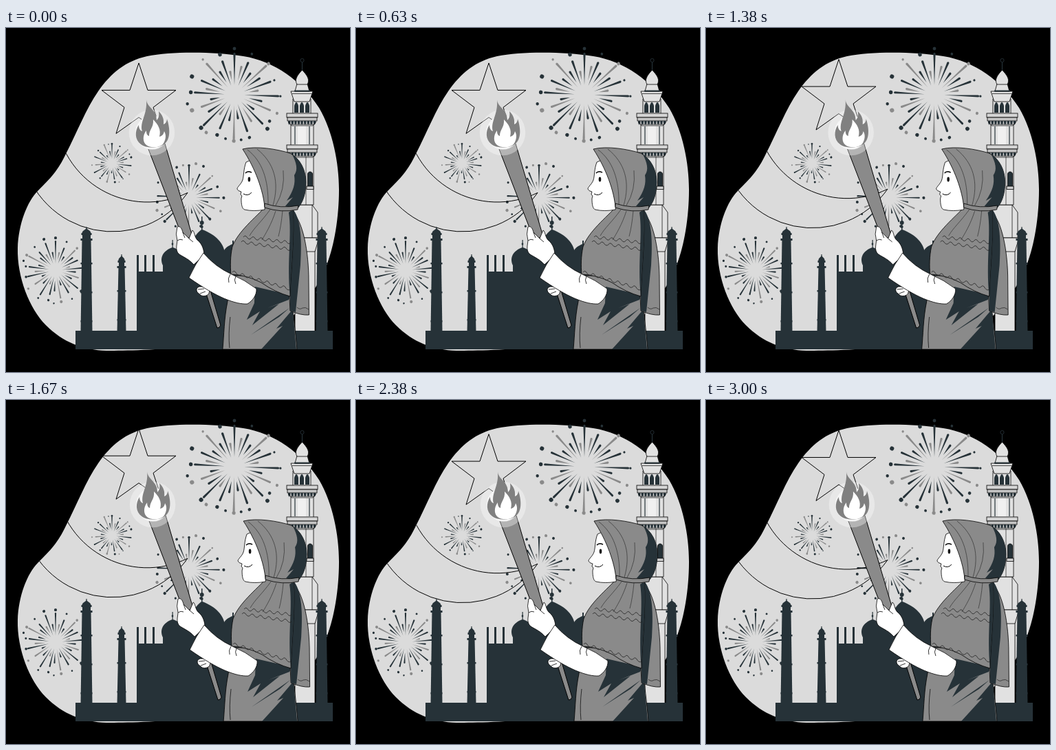
These frames come from a looping animation (500 by 500 pixels, 3.04 s). An HTML page with a canvas:

```html
<!DOCTYPE html>
<html lang="en">
<head>
<meta charset="utf-8">
<title>Torch night</title>
<style>
html, body { margin: 0; width: 100%; height: 100%; overflow: hidden; background: #000; }
canvas { display: block; width: 500px; height: 500px; }
</style>
</head>
<body>
<canvas id="stage"></canvas>
<script>
const LOOP = 3040, LEAD = 20;
const DARK = '#263238', GREY = '#8a8a8a', SKY = '#dbdbdb', STONE = '#e1e1e1';
const canvas = document.getElementById('stage');
const scale = Math.max(1, window.devicePixelRatio || 1);
canvas.width = canvas.height = 500 * scale;
let ctx = canvas.getContext('2d');

function shape(d, fill, stroke, width = 0.8) {
  const p = new Path2D(d);
  if (fill) { ctx.fillStyle = fill; ctx.fill(p); }
  if (stroke) { ctx.strokeStyle = stroke; ctx.lineWidth = width; ctx.stroke(p); }
}
const line = (d, width, color = '#000') => shape(d, null, color, width);
function disc(x, y, r, fill, stroke) {
  ctx.beginPath();
  ctx.arc(x, y, r, 0, Math.PI * 2);
  if (fill) { ctx.fillStyle = fill; ctx.fill(); }
  if (stroke) { ctx.strokeStyle = stroke; ctx.lineWidth = 0.9; ctx.stroke(); }
}
function box(x, y, w, h, fill, stroke) {
  ctx.fillStyle = fill;
  ctx.fillRect(x, y, w, h);
  if (stroke) { ctx.strokeStyle = '#000'; ctx.lineWidth = 0.8; ctx.strokeRect(x, y, w, h); }
}

function random(seed) {
  return () => (seed = (seed * 16807) % 2147483647) / 2147483647;
}

// Tapered rays around a point, with dots beyond some of the tips.
function firework(x, y, r, rays, seed, weight) {
  const rnd = random(seed);
  const reach = [0.8, 0.52, 0.68, 0.42];
  for (let i = 0; i < rays; i++) {
    const a = (i + rnd() * 0.3) / rays * Math.PI * 2 - Math.PI / 2;
    const far = r * (reach[i % 4] + rnd() * 0.12);
    const near = r * (i % 2 ? 0.3 : 0.2);
    const color = i % 3 === 1 ? GREY : DARK;
    ctx.save();
    ctx.translate(x, y);
    ctx.rotate(a);
    ctx.fillStyle = color;
    ctx.beginPath();
    ctx.moveTo(near, 0);
    ctx.lineTo(far, -weight);
    ctx.arc(far, 0, weight, -Math.PI / 2, Math.PI / 2);
    ctx.closePath();
    ctx.fill();
    if (i % 2 === 0 || rnd() > 0.7) {
      disc(r * (0.86 + rnd() * 0.13), 0, weight * (0.9 + rnd() * 1.1), color);
    }
    ctx.restore();
  }
}

function minaret(x, top, half) {
  box(x - 0.6, top, 1.2, 8, DARK);
  shape(`M${x - half + 1} ${top + 12}C${x - half} ${top + 5} ${x - 2} ${top + 5} ${x} ${top + 2}
    C${x + 2} ${top + 5} ${x + half} ${top + 5} ${x + half - 1} ${top + 12}Z`, DARK);
  box(x - half, top + 9, half * 2, 3, DARK);
  box(x - half + 1.5, top + 11, half * 2 - 3, 8, DARK);
  box(x - half - 1, top + 17, half * 2 + 2, 3, DARK);
  shape(`M${x - half + 1} ${top + 18}H${x + half - 1}L${x + half + 1} 442H${x - half - 1}Z`, DARK);
  for (let y = top + 52; y < 435; y += 42) box(x - half - 1, y, half * 2 + 2, 2.5, DARK);
}

function skyline() {
  minaret(117, 289, 7.5);
  minaret(168, 329, 5.5);
  minaret(459, 289, 7.5);
  box(101, 440, 374, 27, DARK);
  box(190, 354, 180, 100, DARK);
  for (const x of [190, 201, 213]) box(x, 330, 3, 26, DARK);
  shape('M228 360V345C223 334 228 324 241.5 319V308H242.7V319C255 323 261 333 257 345V360Z', DARK);
  disc(242, 314, 1.4, DARK);
  shape('M254 360V328C268 324 269 304 284 293V274H285.5V293C306 301 316 313 318 326V360Z', DARK);
  disc(284.7, 283, 3, DARK);
  disc(284.7, 289, 2, DARK);
  shape('M316 360V326C318 319 323 317 329 314V309H331V314C340 318 344 326 344 360Z', DARK);
}

function balcony(y) {
  box(408, y, 45, 6, '#d4d4d4', true);
  box(409, y + 6, 43, 5, '#c4c4c4', true);
  for (let i = 0; i < 9; i++) {
    const x = 410 + i * 4.6;
    shape(`M${x} ${y + 11}h3.4v3l-1.7 3l-1.7 -3z`, DARK);
  }
  line(`M411 ${y + 12}L415 ${y + 18}H446L451 ${y + 12}`, 0.7);
}

function tower() {
  shape('M420 322H449V467H420Z', STONE, '#000');
  shape('M415 257H445L453 268V305H415Z', STONE, '#000');
  line('M445 257V305', 0.7);
  shape('M414 305H455L449 325H420Z', STONE, '#000');
  shape('M416 186H447V257H416Z', STONE, '#000');
  line('M436 187V257', 0.6);
  shape('M438.5 231V212C439 208 445 208 445.5 212V231Z', DARK, '#000');
  box(437, 230, 10, 4.5, '#d0d0d0', true);
  shape('M414 140H447V171H414Z', STONE, '#000');
  for (const x of [420, 441]) line(`M${x} 143V169`, 1.2, DARK);
  box(424, 142, 12, 28, '#f0f0f0');
  balcony(170);
  shape('M417 103H443V125H417Z', STONE, '#000');
  for (const x of [419, 427, 435]) {
    shape(`M${x} 123V113Q${x + 3} 103 ${x + 6} 113V123Z`, DARK);
  }
  balcony(124);
  shape('M414 92H446L441 107H419Z', STONE, '#000');
  line('M416 95.5H444', 0.7);
  shape('M423 81H438L441 92H420Z', STONE, '#000');
  shape('M423 82C419 75 423 69 430.5 61C438 69 442 75 438 82Z', STONE, '#000');
  box(419, 90.5, 23, 2, DARK);
  line('M430.5 61V50', 1.2, DARK);
  disc(430.5, 47, 2.6, null, DARK);
}

const BLOB = 'M17 320C18 285 31 252 46 237C65 218 75 208 87 183C104 150 116 118 134 92'
  + 'C153 65 174 48 205 41C240 34 300 34 345 41C390 48 430 77 455 116C475 150 484 196 484 235'
  + 'C484 276 477 316 467 342C454 376 430 412 400 432C340 465 200 469 146 469'
  + 'C112 468 83 457 58 432C34 408 16 362 17 320Z';

function background() {
  shape(BLOB, SKY);
  firework(332, 97, 71, 32, 71, 1.6);
  firework(266, 246, 51, 32, 19, 1.1);
  firework(154, 197, 31, 30, 43, 0.8);
  firework(72, 352, 49, 34, 87, 1.1);
}

function starAndMoon(dy) {
  ctx.save();
  ctx.clip(new Path2D(BLOB));
  ctx.translate(0, dy - 0.6);
  line('M193 51.5L206 91H247L214 116L226.5 154L193 130.5L160 154L172 116L139 91H180Z', 1);
  line('M24 190A133.6 133.6 0 0 0 264 240A133.6 133.6 0 0 1 72 130', 1);
  ctx.restore();
}

function torch() {
  shape('M290 383L297 381L312 432Q311 436 307 436Z', GREY, '#000', 1);
  shape('M207 176L231 168L271 303L258 308Z', GREY, '#000', 1);
  disc(212, 152, 33.3, 'rgba(255,255,255,0.36)');
  disc(212.5, 152, 24.5, '#f6f6f6');
  shape('M204 104C205 116 219 118 219 134C222 131 223 127 222 121C228 127 230 133 229 140'
    + 'C232 139 234 136 234 132C239 147 239 162 230 169C222 175 203 175 196 169'
    + 'C187 162 187 150 193 141C193 146 195 149 198 150C194 136 206 126 204 104Z', '#808080');
  shape('M214 133C215 145 208 147 208 157C205 156 204 153 204 149C198 157 199 166 204 170'
    + 'C210 175 223 174 228 169C233 162 233 155 230 150C229 155 227 157 223 158'
    + 'C226 148 221 140 214 133Z', '#fff');
}

// Scalloped trim along a straight run.
function trim(x, y, dx, dy, n) {
  let d = `M${x} ${y}`;
  for (let i = 0; i < n; i++) d += `q${dx / n / 2} ${i % 2 ? 4 : -4} ${dx / n} ${dy / n}`;
  line(d, 0.8, '#222');
}

function dress() {
  shape('M328 360L322 398C317 422 317 446 315 467H423C421 440 417 415 414 380L370 360Z', GREY, '#000');
  shape('M362 376L414 388L411 395L380 407L397 401L358 432L369 412L350 424L361 400Z', DARK);
  shape('M412 407L356 446L397 420Z', DARK);
  shape('M415 411L393 437L402 433L371 467H422L417 411Z', DARK);
  line('M326 420Q323 445 325 465', 0.7);
}

function veil() {
  shape('M410 262C430 272 439 318 440 360L440.5 417Q429 418 413 411L408 300Z', GREY, '#000');
  shape('M416 262C427 274 431 300 428 345L421 413L413 411V388L408 300Z', DARK);
  line('M423 406q4 4 8 1q4 -2 9 2', 0.7, '#222');
  shape('M379 258C362 276 337 296 329 318C326 332 326 346 327 358Q350 359 371 370'
    + 'Q391 384 413 390C414 354 420 300 417 264Z', GREY, '#000');
  shape('M411 268C416 300 408 340 413 390C414 354 420 300 417 264Z', DARK);
  trim(345, 304, 69, 8, 12);
  trim(342, 311, 72, 11, 12);
  trim(329, 355, 84, 25, 14);
  line('M384 264C371 282 361 290 354 302M392 266C386 285 377 300 372 308'
    + 'M402 266Q400 288 396 303', 0.7, '#333');
}

function head() {
  shape('M349 195C345 206 346 215 344 221C342 227 336 231 336 234Q337 237 342 238'
    + 'L341 242L343 244L342 248C342 256 343 263 347 264Q360 267 376 264L380 225L360 190Z', '#fff', '#000');
  shape('M344 176C364 171 394 176 413 182C428 190 436 207 436 224C436 242 431 255 423 263'
    + 'L376 260C374 237 363 205 344 176Z', GREY, '#000');
  shape('M416 184C428 191 436 207 436 224C436 242 431 255 423 263L406 259L417 246L408 251'
    + 'C418 237 421 226 419 214C425 206 422 195 416 184Z', DARK);
  line('M351 177C372 193 382 220 381 258M365 176C390 196 398 224 388 258'
    + 'M403 207Q406 235 392 258', 0.7, '#333');
  shape('M376 255Q399 263 425 258L424 264Q400 269 376 261Z', GREY, '#000');
  ctx.fillStyle = '#111';
  ctx.beginPath();
  ctx.ellipse(353.5, 220, 1.8, 3.4, 0, 0, Math.PI * 2);
  ctx.fill();
  line('M348 211Q351 207 357 210', 1.4);
  line('M345 241Q352 245 357 239', 1);
}

function arm() {
  shape('M281 376Q275 378 278 384L284 389Q291 391 295 386L297 376Z', '#fff', '#000');
  line('M279 380L288 379M282 386L290 383', 0.8);
  shape('M249 289C254 287 256 293 257 297L266 306L271 294C274 295 274 304 278 308'
    + 'C286 314 288 324 288 330L273 344C266 336 260 334 252 329Q247 325 248 317'
    + 'L249 309Q246 300 249 289Z', '#fff', '#000');
  line('M249 309Q253 306 257 308M257 297L260 305M266 306L272 311', 0.8);
  shape('M287 327Q304 347 328 358Q347 366 364 379C365 388 358 397 351 401'
    + 'C334 402 307 392 266 363Q275 343 287 327Z', '#fff', '#000');
  line('M326 358Q322 364 324 370M334 361Q331 366 334 372', 0.8);
}

function woman(dx) {
  ctx.save();
  ctx.translate(dx, 0);
  torch();
  dress();
  veil();
  head();
  arm();
  ctx.restore();
}

// Layers that never move are painted once.
function layer(paint) {
  const c = document.createElement('canvas');
  c.width = c.height = canvas.width;
  const main = ctx;
  ctx = c.getContext('2d');
  ctx.scale(scale, scale);
  paint();
  ctx = main;
  return c;
}
const back = layer(background);
const city = layer(() => { tower(); skyline(); });

const SHAKE = [0, -1, 2, -4, 4, -4, 4, -4, 2, -1, 0];
function shake(t) {
  const p = t / 3000 % 1 * 10, i = Math.floor(p);
  return SHAKE[i] + (SHAKE[i + 1] - SHAKE[i]) * (p - i);
}
function float(t) {
  if (t < 1000) return 0;
  const p = (t - 1000) / 1500 % 1;
  return -20 * Math.min(p, 1 - p);
}

function draw() {
  const t = performance.now() % LOOP + LEAD;
  ctx.setTransform(scale, 0, 0, scale, 0, 0);
  box(0, 0, 500, 500, '#000');
  ctx.drawImage(back, 0, 0, 500, 500);
  starAndMoon(float(t));
  ctx.drawImage(city, 0, 0, 500, 500);
  woman(shake(t));
  requestAnimationFrame(draw);
}
draw();
</script>
</body>
</html>
```
